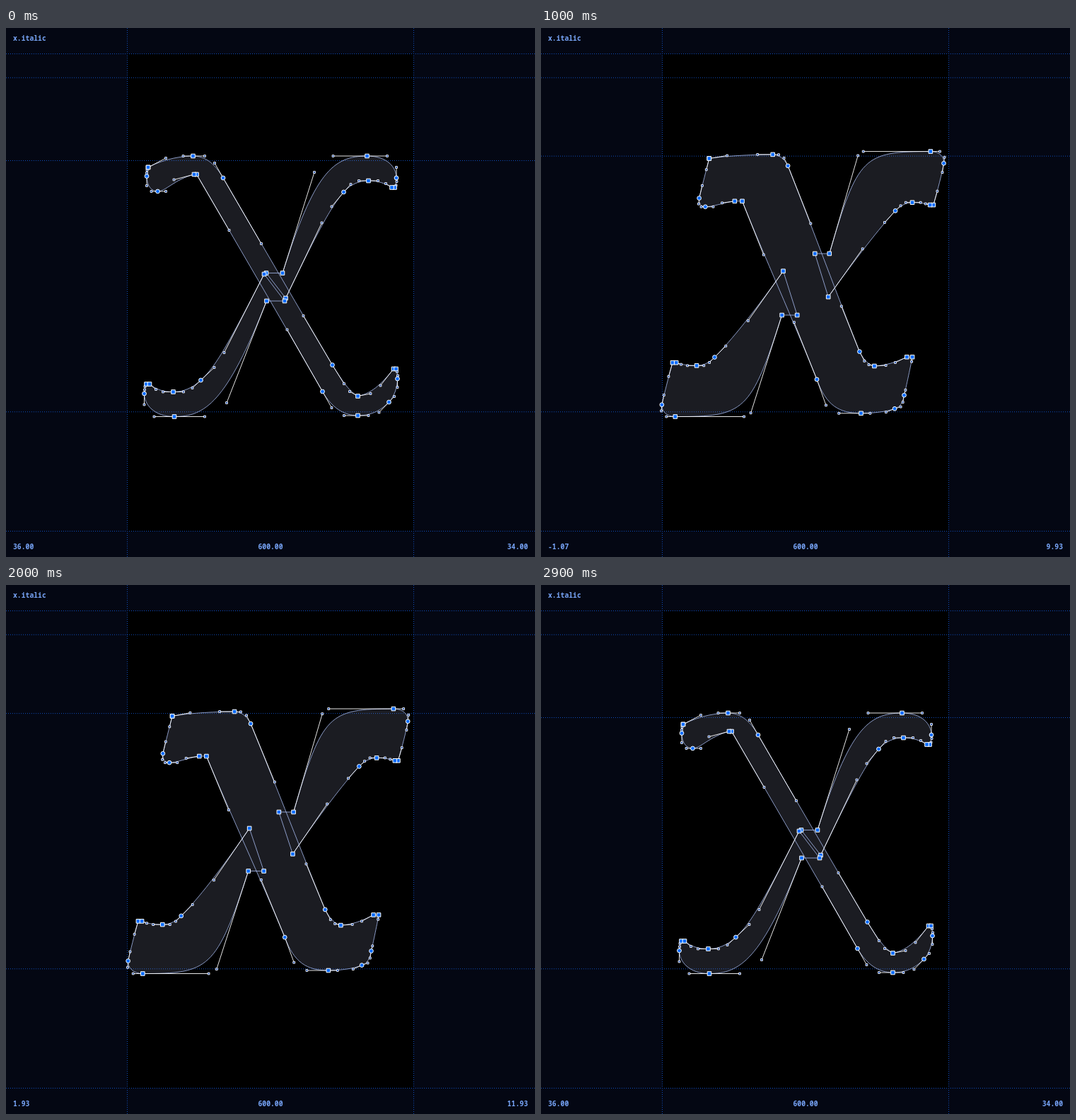
Recreate the animation shown at these times as an HTML page with a canvas. Size 748x748 px, loop 3 s.

```html
<!DOCTYPE html>
<html lang="en">
<head>
<meta charset="utf-8">
<title>x.italic</title>
<style>
  html, body { margin: 0; width: 100%; height: 100%; overflow: hidden; background: #040713; }
  #stage { position: absolute; left: 0; top: 0; width: 748px; height: 748px; }
  canvas { position: absolute; left: 0; top: 0; width: 748px; height: 748px; }
  span {
    position: absolute; font: 600 9.75px/14px "Noto Sans Mono", "DejaVu Sans Mono", monospace;
    color: #78a5f8; white-space: pre;
  }
  #name { left: 10px; top: 8px; }
  #left { left: 10px; top: 727px; }
  #width { left: 274px; width: 200px; top: 727px; text-align: center; }
  #right { right: 10px; top: 727px; }
</style>
</head>
<body>
<div id="stage">
  <canvas id="view" width="748" height="748"></canvas>
  <span id="name">x.italic</span>
  <span id="left"></span>
  <span id="width">600.00</span>
  <span id="right"></span>
</div>
<script>
// Outline segments: M start, L line, C curve to a corner, O curve to a smooth point.
const light = [
  `M201 197 C226 184 250.5 181 264.5 181 O281 181 295 191 307 212
   O361 305 420.5 407 461.5 476.5 C478 503 486 514 497.5 520.5
   C515.5 517 529.5 505.5 548 482 L551.5 482 O553 486 554 491.5 553.5 496
   O553.5 508 549 521 541.5 529 C527.5 543.5 512.5 548 497.5 548
   O478 548 460.5 537 447.5 514 C397.5 426.5 315.5 286 269.5 207 L266 207
   O237.5 214.5 226 231 214.5 231 O205.5 231 199 223 199 209.5
   C199 205 199.5 201 201 197`,
  `M368 346.5 L391 346.5 C436 204 462.5 181 510.5 181 O539 181 552 197 552 212
   C552.5 217 551.5 222.5 549.5 225.5 L545.5 225.5 C537 220 526 216 512.5 216
   O499 216 487.5 221 477.5 232 C460.5 252.5 446.5 275.5 395.5 382`,
  `M394 386 L368.5 386 C312 530 281 549.5 238 549.5 O209.5 549.5 195.5 532.5 195.5 517
   C196 511.5 196.5 507 198.5 503.5 L203 503.5 C212 511 222 514.5 236.5 514.5
   O251 514.5 263.5 509 275.5 498 C294.5 480 308.5 459 365 348`
];
const heavy = [
  `M252.5 179.5 C278 179 328.5 178 353 178 O358 178.5 363 181 366 188
   O389.5 265 426.5 388 446 450 C449 458 454.5 461 461 461
   C476.5 461 489.5 460 505 458.5 L514.5 458.5 O512.5 466 500 520 497.5 528.5
   O495 537.5 492.5 541.5 483.5 542 C472 543 446.5 543.5 434.5 543.5
   O398.5 543.5 380 532 367 490 C342 412 314.5 334.5 290.5 260 L277 260
   O263.5 260.5 250.5 261.5 239.5 261.5 O235 261.5 232.5 259 233.5 253
   C239.5 230 247.5 200 252.5 179.5`,
  `M395 308 L414.5 308 C453 171 453 172 567 172 O574 172 578 177 576.5 183
   C573.5 199 564 234 557 260 L552 260 C546.5 260 541 259 530 259
   O522.5 259 517 263.5 510.5 269 C496 284 458 327 410.5 379.5`,
  `M349.5 414 L329.5 414 C290.5 550 289.5 549.5 170.5 549.5 O164.5 549.5 160 545 161 539
   C165 522 174 487 181 461 L186.5 461 C192.5 461.5 201 462.5 213.5 462.5
   O222 462.5 228 458.5 233.5 452.5 C248 437.5 286.5 396 333.5 342`
];

const SIZE = 748, STEP = 100, STEPS = 30;
// steps from light to heavy and back
const RISE = 14, FALL = 13.6;

// weight, left bearing, right bearing
const bearings = [
  [0, 36, 34], [4 / FALL, 20.96, 25], [6 / RISE, 13.95, 20],
  [9 / FALL, 1.93, 11.93], [10 / RISE, -1.07, 9.93], [1, -15.38, -0.38]
];

const $ = id => document.getElementById(id);
const g = $('view').getContext('2d');
const mix = (a, b, t) => a + (b - a) * t;

const parse = d => d.match(/[MLCO][^MLCO]*/g).map(s => ({
  kind: s[0], xy: s.slice(1).trim().split(/\s+/).map(Number)
}));
const masters = light.map((d, i) => [parse(d), parse(heavy[i])]);

const shapeAt = t => masters.map(([a, b]) => a.map((seg, i) => ({
  kind: seg.kind, xy: seg.xy.map((v, j) => mix(v, b[i].xy[j], t))
})));

const weightAt = k => k <= RISE ? k / RISE : (STEPS - 1 - k) / FALL;

function bearingAt(t, col) {
  let i = 1;
  while (i < bearings.length - 1 && bearings[i][0] < t) i++;
  const a = bearings[i - 1], b = bearings[i];
  return mix(a[col], b[col], (t - a[0]) / (b[0] - a[0])).toFixed(2);
}

function line(x1, y1, x2, y2) {
  g.moveTo(x1, y1);
  g.lineTo(x2, y2);
}

function box(x, y, size) {
  g.beginPath();
  g.rect(x - size / 2, y - size / 2, size, size);
  g.fill();
  g.stroke();
}

function dot(x, y) {
  g.beginPath();
  g.arc(x, y, 2.9, 0, Math.PI * 2);
  g.fill();
  g.stroke();
}

function drawGuides(t) {
  g.beginPath();
  for (const x of [171.5, 576.5]) line(x, 0, x, SIZE);
  for (const y of [36.5, 70.25, mix(187.5, 178.6, t), 542.75, 711.5]) line(0, y, SIZE, y);
  g.setLineDash([1, 2]);
  g.strokeStyle = '#0f4cba';
  g.lineWidth = 1;
  g.stroke();
  g.setLineDash([]);
}

function drawOutline(shape) {
  g.beginPath();
  for (const contour of shape) {
    for (const { kind, xy } of contour) {
      if (kind === 'M') g.moveTo(...xy);
      else if (kind === 'L') g.lineTo(...xy);
      else g.bezierCurveTo(...xy);
    }
    g.closePath();
  }
  g.fillStyle = 'rgba(200, 205, 255, 0.135)';
  g.fill();
  g.strokeStyle = '#a9bdf2';
  g.lineWidth = 0.8;
  g.stroke();
}

function drawHandles(shape) {
  const ends = [];
  g.beginPath();
  for (const contour of shape) {
    let last;
    for (const { xy } of contour) {
      if (xy.length > 2) {
        const [x1, y1, x2, y2, x, y] = xy;
        line(...last, x1, y1);
        line(x2, y2, x, y);
        ends.push([x1, y1], [x2, y2]);
      }
      last = xy.slice(-2);
    }
  }
  g.strokeStyle = '#fff';
  g.lineWidth = 0.9;
  g.stroke();
  g.fillStyle = '#0b3fa8';
  for (const p of ends) box(...p, 2.8);
}

function drawNodes(shape) {
  g.fillStyle = '#0a6cff';
  g.strokeStyle = '#fff';
  g.lineWidth = 1;
  for (const contour of shape) {
    for (const { kind, xy } of contour) {
      const p = xy.slice(-2);
      if (kind === 'O') dot(...p);
      else box(...p, 5.6);
    }
  }
}

function draw(t) {
  const shape = shapeAt(t);
  g.fillStyle = '#040713';
  g.fillRect(0, 0, SIZE, SIZE);
  g.fillStyle = '#000';
  g.fillRect(171.5, 36.5, 405, 675);
  drawGuides(t);
  drawOutline(shape);
  drawHandles(shape);
  drawNodes(shape);
  $('left').textContent = bearingAt(t, 1);
  $('right').textContent = bearingAt(t, 2);
}

const start = performance.now();
let shown = -1;
function tick() {
  const k = Math.floor((performance.now() - start) / STEP) % STEPS;
  if (k !== shown) draw(weightAt(shown = k));
  requestAnimationFrame(tick);
}
tick();
</script>
</body>
</html>
```
